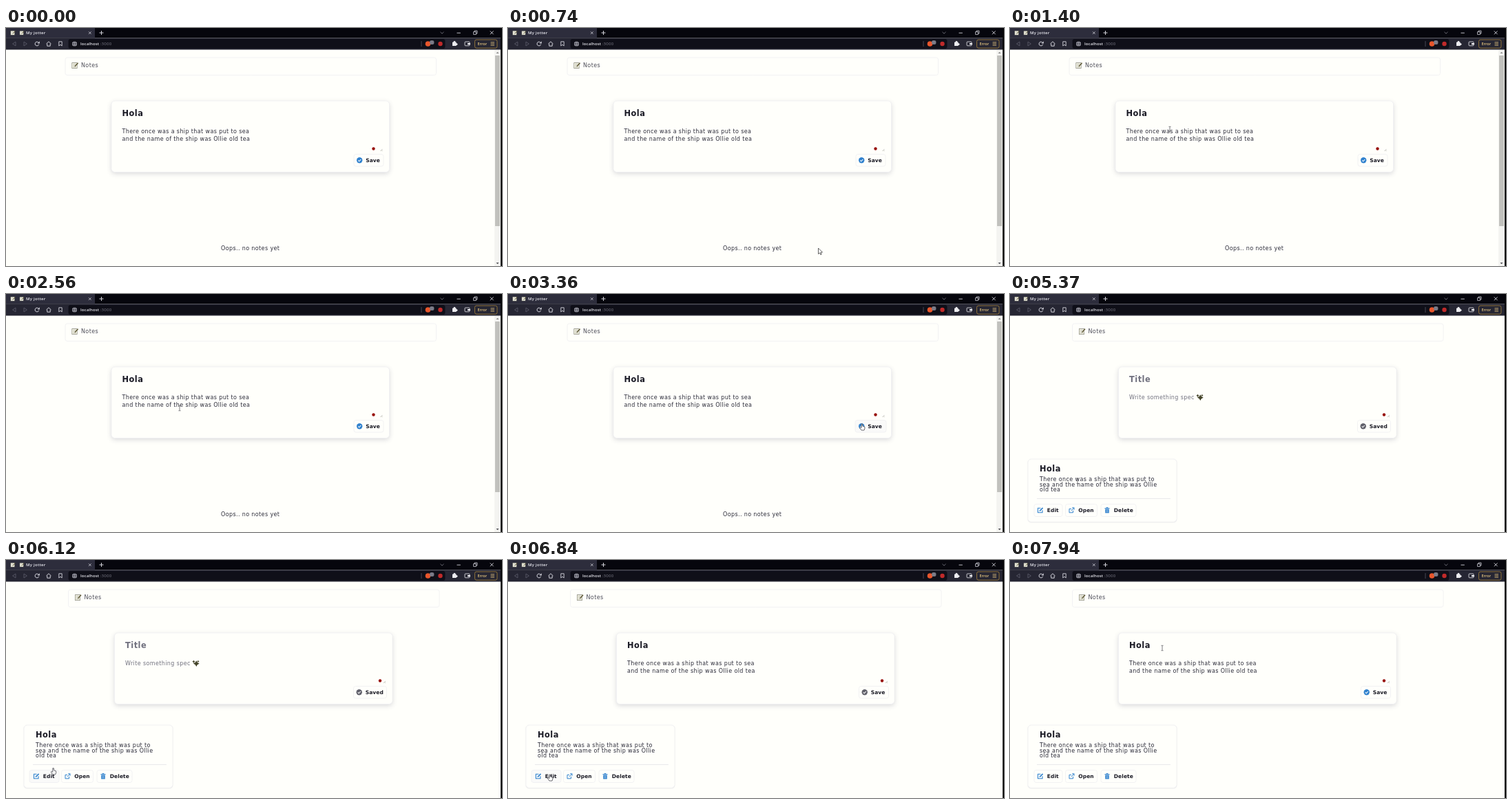
An HTML page with a canvas for the animation above (7.99 s loop, 720 px wide and 346 px high).

```html
<!DOCTYPE html>
<html lang="en">
<head>
<meta charset="utf-8">
<title>Notes</title>
<style>
  html, body { margin: 0; width: 100%; height: 100%; overflow: hidden; background: #fffffb; }
  canvas { display: block; width: 720px; height: 346px; }
</style>
</head>
<body>
<canvas id="stage"></canvas>
<script>
const W = 720, H = 346, LOOP = 7990;
const SAVE_AT = 4260, DOT_AT = 4900, EDIT_AT = 6600;
const PAGE = '#fffffb', HOT = '#fafaf9', LINE = '#efeff2';
const INK = '#1b1b26', BODY = '#2c2c3a', SOFT = '#71717f', BLUE = '#3182ce';
const FRAME = '#06060d', TAB = '#2d2d3c', BAR = '#262633', FIELD = '#0f0f18', CHROME = '#d4d4dc';
const WIDE = '"DejaVu Sans", sans-serif', UI = '"Open Sans", sans-serif';

const canvas = document.getElementById('stage');
const ctx = canvas.getContext('2d');
const dpr = window.devicePixelRatio || 1;
canvas.width = W * dpr;
canvas.height = H * dpr;

// Pointer moves: start, end, from x, y, to x, y
const moves = [
  [660, 1400, 458, 326, 232, 147],
  [1470, 2210, 232, 147, 252, 166],
  [2560, 3330, 252, 166, 514, 193],
  [3360, 3650, 514, 193, 519, 196],
  [4720, 5370, 519, 196, 98, 272],
  [5600, 6340, 98, 272, 61, 316],
  [7320, 7900, 61, 316, 221, 128]
];

function pointer(t) {
  let p = { x: moves[0][2], y: moves[0][3] };
  for (const [a, b, x0, y0, x1, y1] of moves) {
    if (t < a) break;
    const k = Math.min(1, (t - a) / (b - a));
    const e = k * k * (3 - 2 * k);
    p = { x: x0 + (x1 - x0) * e, y: y0 + (y1 - y0) * e };
  }
  return p;
}

const inside = (p, x, y, w, h) => p.x >= x && p.x <= x + w && p.y >= y && p.y <= y + h;

function text(s, x, y, { size = 8, weight = 400, color = BODY, gap = 0.38, font = WIDE } = {}) {
  ctx.font = `${weight} ${size}px ${font}`;
  ctx.letterSpacing = gap + 'px';
  ctx.fillStyle = color;
  ctx.fillText(s, x, y);
}

const title = (s, x, y, color = INK) => text(s, x, y, { size: 11.4, weight: 700, gap: 0.5, color });
const label = (s, x, y) => text(s, x, y, { size: 7.5, weight: 700, gap: 0.1, color: INK });

function rect(x, y, w, h, color) {
  ctx.fillStyle = color;
  ctx.fillRect(x, y, w, h);
}

function disc(x, y, r, color) {
  ctx.fillStyle = color;
  ctx.beginPath();
  ctx.arc(x, y, r, 0, Math.PI * 2);
  ctx.fill();
}

function line(points, color, width = 1, close = false) {
  ctx.beginPath();
  points.forEach(([x, y]) => ctx.lineTo(x, y));
  if (close) ctx.closePath();
  ctx.strokeStyle = color;
  ctx.lineWidth = width;
  ctx.stroke();
}

function shape(points, color) {
  ctx.beginPath();
  points.forEach(([x, y]) => ctx.lineTo(x, y));
  ctx.closePath();
  ctx.fillStyle = color;
  ctx.fill();
}

function box(x, y, w, h, { r = 4, fill = PAGE, stroke = LINE, shadow = 0 } = {}) {
  ctx.save();
  if (shadow) {
    ctx.shadowColor = 'rgba(60,60,90,.2)';
    ctx.shadowBlur = shadow * dpr;
    ctx.shadowOffsetY = shadow / 3 * dpr;
  }
  ctx.beginPath();
  ctx.roundRect(x, y, w, h, r);
  ctx.fillStyle = fill;
  ctx.fill();
  ctx.restore();
  ctx.strokeStyle = stroke;
  ctx.lineWidth = 0.8;
  ctx.stroke();
}

function at(x, y, draw) {
  ctx.save();
  ctx.translate(x, y);
  draw();
  ctx.restore();
}

function memo(x, y, s) {
  at(x, y, () => {
    ctx.scale(s, s);
    rect(-4.5, -4, 8, 8.5, '#77776a');
    rect(-3.9, -3.3, 6.8, 7.2, '#f6f5e6');
    for (let i = 0; i < 3; i++) line([[-2.8, -1.5 + i * 2], [1.8, -1.5 + i * 2]], '#9a9a90', 0.6);
    line([[0, 1.5], [4.6, -3.6]], '#5a5430', 1.3);
  });
}

function check(x, y, color) {
  disc(x, y, 4.2, color);
  line([[x - 2, y], [x - 0.5, y + 1.5], [x + 2.1, y - 1.3]], '#fff', 1.1);
}

function editIcon(x, y) {
  line([[x + 0.5, y - 3], [x - 3.5, y - 3], [x - 3.5, y + 3.5], [x + 3, y + 3.5], [x + 3, y]], BLUE, 1.1);
  line([[x - 1, y + 1.2], [x + 3.6, y - 3.4]], BLUE, 1.7);
}

function openIcon(x, y) {
  line([[x - 0.5, y - 2], [x - 3.5, y - 2], [x - 3.5, y + 3.5], [x + 2, y + 3.5], [x + 2, y + 0.5]], BLUE, 1);
  line([[x - 1, y + 1], [x + 3.5, y - 3.5]], BLUE, 1);
  line([[x + 0.6, y - 3.5], [x + 3.5, y - 3.5], [x + 3.5, y - 0.6]], BLUE, 1);
}

function trashIcon(x, y) {
  rect(x - 3.5, y - 3.2, 7, 1.2, BLUE);
  rect(x - 1.3, y - 4.2, 2.6, 1.2, BLUE);
  rect(x - 2.8, y - 1.5, 5.6, 5.6, BLUE);
  line([[x - 0.9, y - 0.5], [x - 0.9, y + 3]], PAGE, 0.5);
  line([[x + 0.9, y - 0.5], [x + 0.9, y + 3]], PAGE, 0.5);
}

function sparkle(x, y) {
  const star = (cx, cy, r) => {
    const pts = [];
    for (let i = 0; i < 8; i++) {
      const a = i * Math.PI / 4, d = i % 2 ? r * 0.5 : r;
      pts.push([cx + Math.sin(a) * d, cy - Math.cos(a) * d]);
    }
    shape(pts, '#45452a');
  };
  star(x + 0.8, y + 0.6, 4.4);
  star(x - 3, y - 2.2, 2.3);
  star(x + 3.4, y - 2.6, 1.7);
}

function tabBar() {
  rect(0, 0, W, 14.5, FRAME);
  rect(0, 0, 129, 14.5, TAB);
  memo(10, 7, 0.75);
  memo(23, 7, 0.7);
  text('My jotter', 29, 9.2, { size: 6, weight: 600, color: '#ececf2', gap: 0.25, font: UI });
  line([[120, 5.3], [123.6, 8.9]], CHROME, 0.8);
  line([[123.6, 5.3], [120, 8.9]], CHROME, 0.8);
  line([[135.5, 7], [141.5, 7]], CHROME);
  line([[138.5, 4], [138.5, 10]], CHROME);
  line([[630.5, 5.8], [633, 8.2], [635.5, 5.8]], '#85858f', 0.8);
  line([[654.5, 7.2], [659.8, 7.2]], CHROME, 0.9);
  line([[680, 5.5], [680, 4], [684, 4], [684, 8], [682.6, 8]], CHROME, 0.8);
  line([[678.6, 5.6], [682.4, 5.6], [682.4, 9.4], [678.6, 9.4]], CHROME, 0.8, true);
  line([[702.8, 4.4], [707.6, 9.2]], CHROME, 0.9);
  line([[707.6, 4.4], [702.8, 9.2]], CHROME, 0.9);
}

function navBar() {
  rect(0, 14.5, W, 17, BAR);
  line([[14, 20], [9.6, 23], [14, 26]], '#5a5a68', 0.9, true);
  line([[26, 20], [30.4, 23], [26, 26]], '#5a5a68', 0.9, true);
  ctx.beginPath();
  ctx.arc(45, 23, 2.9, 0.3, 5.5);
  ctx.strokeStyle = CHROME;
  ctx.lineWidth = 1;
  ctx.stroke();
  shape([[48.8, 19.2], [48.8, 22.6], [45.6, 22.4]], CHROME);
  line([[58.5, 23], [62, 19.8], [65.5, 23]], CHROME);
  line([[59.8, 22.8], [59.8, 26.2], [64.2, 26.2], [64.2, 22.8]], CHROME);
  line([[76.8, 19.8], [81.2, 19.8], [81.2, 26], [79, 24.2], [76.8, 26]], CHROME, 0.9, true);

  box(91, 16.5, 546, 13, { r: 2, fill: FIELD, stroke: FIELD });
  disc(99.5, 23, 3.5, '#b0b0ba');
  line([[96, 23], [103, 23]], FIELD, 0.6);
  ctx.beginPath();
  ctx.ellipse(99.5, 23, 1.5, 3.4, 0, 0, Math.PI * 2);
  ctx.stroke();
  text('localhost', 108, 25.2, { size: 6, weight: 600, color: '#e6e6ec', gap: 0.12, font: UI });
  text(':3000', 136.7, 25.2, { size: 6, color: '#7c7c88', gap: 0.3, font: UI });
  line([[603, 19], [603, 27]], '#62626e', 0.7);
  disc(612.5, 23, 3.8, '#e8562c');
  box(615.5, 18.5, 5.5, 5, { r: 1.5, fill: '#7c7c88', stroke: '#7c7c88' });
  disc(630.5, 23, 3.2, '#c02a2a');

  rect(648, 20.6, 5.6, 5.4, '#eeeef2');
  disc(651, 20.2, 1.5, '#eeeef2');
  disc(654, 23.4, 1.5, '#eeeef2');
  box(666, 20, 7, 5.8, { r: 1, fill: BAR, stroke: '#eeeef2' });
  rect(670, 22, 4, 2.2, '#eeeef2');
  box(680.5, 17, 32.5, 12.2, { r: 2.5, fill: BAR, stroke: '#a8843c' });
  text('Error', 684.5, 25, { size: 5.6, weight: 600, color: '#e8c880', gap: 0, font: UI });
  for (let i = 0; i < 3; i++) line([[703.5, 20.8 + i * 2.2], [709, 20.8 + i * 2.2]], '#e8c880', 0.8);
}

function scrollBar() {
  rect(709, 31.5, 9, H - 31.5, '#f4f4f1');
  rect(710, 40, 7, 248, '#c1c1bd');
  shape([[711.5, 37], [713.5, 34.8], [715.5, 37]], '#8a8a8a');
  shape([[711.5, 341], [713.5, 343.2], [715.5, 341]], '#505055');
}

function editor(t, dx, p) {
  const saved = t >= SAVE_AT && t < EDIT_AT;
  const x = 168.5 + dx;
  box(153 + dx, 106, 403.5, 103.5, { r: 5, shadow: 7 });
  if (saved) {
    title('Title', x, 127.5, SOFT);
    text('Write something spec', x, 153, { color: SOFT });
    sparkle(275.5, 150);
  } else {
    title('Hola', x, 127.5);
    text('There once was a ship that was put to sea', x, 153);
    text('and the name of the ship was Ollie old tea', x, 164);
  }
  const hx = 546.5 + dx;
  line([[hx - 3, 179], [hx, 176]], '#a8a8a0', 0.7);
  line([[hx - 1, 179], [hx, 178]], '#a8a8a0', 0.7);
  disc(t < DOT_AT ? 533.5 : 543, 175.5, 2.2, '#98100a');

  const w = saved ? 48 : 43, bx = 548 + dx - w;
  const hot = inside(p, bx, 183, w, 18);
  box(bx - (hot ? 1 : 0), 183.5, w + (hot ? 2 : 0), 17.5, { r: 3, fill: hot ? HOT : PAGE });
  check(bx + 8.2, 192.3, t > 4720 && t < 7320 ? '#62626c' : BLUE);
  label(saved ? 'Saved' : 'Save', bx + 17.2, 194.8);
}

const buttons = [
  ['Edit', 35, 41, editIcon],
  ['Open', 80.5, 46, openIcon],
  ['Delete', 132, 51, trashIcon]
];

function noteCard(p) {
  box(26, 240, 216, 91.5, { r: 5, shadow: 1.5 });
  title('Hola', 43, 257.5);
  text('There once was a ship that was put to', 43, 272);
  text('sea and the name of the ship was Ollie', 43, 279.7);
  text('old tea', 43, 287.4);
  line([[39, 297.5], [233, 297.5]], '#e4e4e8', 0.8);
  for (const [name, x, w, icon] of buttons) {
    const hot = inside(p, x, 306, w, 18);
    box(x - (hot ? 1 : 0), 305.5, w + (hot ? 2 : 0), 18, { r: 3, fill: hot ? HOT : PAGE });
    icon(x + 9, 314.3);
    label(name, x + 18.7, 316.8);
  }
}

function cursor(p, t) {
  const dx = t < SAVE_AT ? 0 : 4.5;
  const hand = inside(p, 502, 183, 50, 18) ||
    (t >= SAVE_AT && buttons.some(([, x, w]) => inside(p, x, 306, w, 18)));
  const beam = inside(p, 164 + dx, 114, 380, 66) ||
    (t >= SAVE_AT && inside(p, 43, 248, 170, 40));
  at(p.x, p.y, () => {
    if (hand) {
      const pts = [[-1, -4], [0.6, -4], [0.6, -1], [3.6, 0], [4, 2], [3, 5], [-1, 5], [-3.6, 1.4], [-2.6, 0.6], [-1, 1.6]];
      shape(pts, '#fff');
      line(pts, '#44444c', 0.8, true);
    } else if (beam) {
      line([[0, -3.5], [0, 3.5]], '#5c5c62', 0.8);
      line([[-1.6, -3.7], [1.6, -3.7]], '#5c5c62', 0.7);
      line([[-1.6, 3.7], [1.6, 3.7]], '#5c5c62', 0.7);
    } else {
      const pts = [[0, 0], [0, 8.5], [2, 6.8], [3.4, 9.6], [4.6, 9], [3.4, 6.2], [6, 6]];
      shape(pts, '#fff');
      line(pts, '#222', 0.7, true);
    }
  });
}

function draw(t) {
  ctx.setTransform(dpr, 0, 0, dpr, 0, 0);
  rect(0, 0, W, H, PAGE);
  const p = t < 320 ? { x: -50, y: -50 } : pointer(t);
  const listed = t >= SAVE_AT;
  const dx = listed ? 4.5 : 0;

  box(86 + dx, 43, 538.5, 25.5, { r: 3 });
  memo(100 + dx, 54.3, 1);
  text('Notes', 109 + dx, 57, { color: '#4c4c58' });
  editor(t, dx, p);
  if (listed) {
    noteCard(p);
  } else {
    text('Oops.. no notes yet', 312, 322.5);
    scrollBar();
  }
  tabBar();
  navBar();
  rect(718, 0, 2, H, '#050508');
  cursor(p, t);
}

const start = performance.now();
function tick() {
  draw((performance.now() - start) % LOOP);
  requestAnimationFrame(tick);
}
tick();
</script>
</body>
</html>
```
